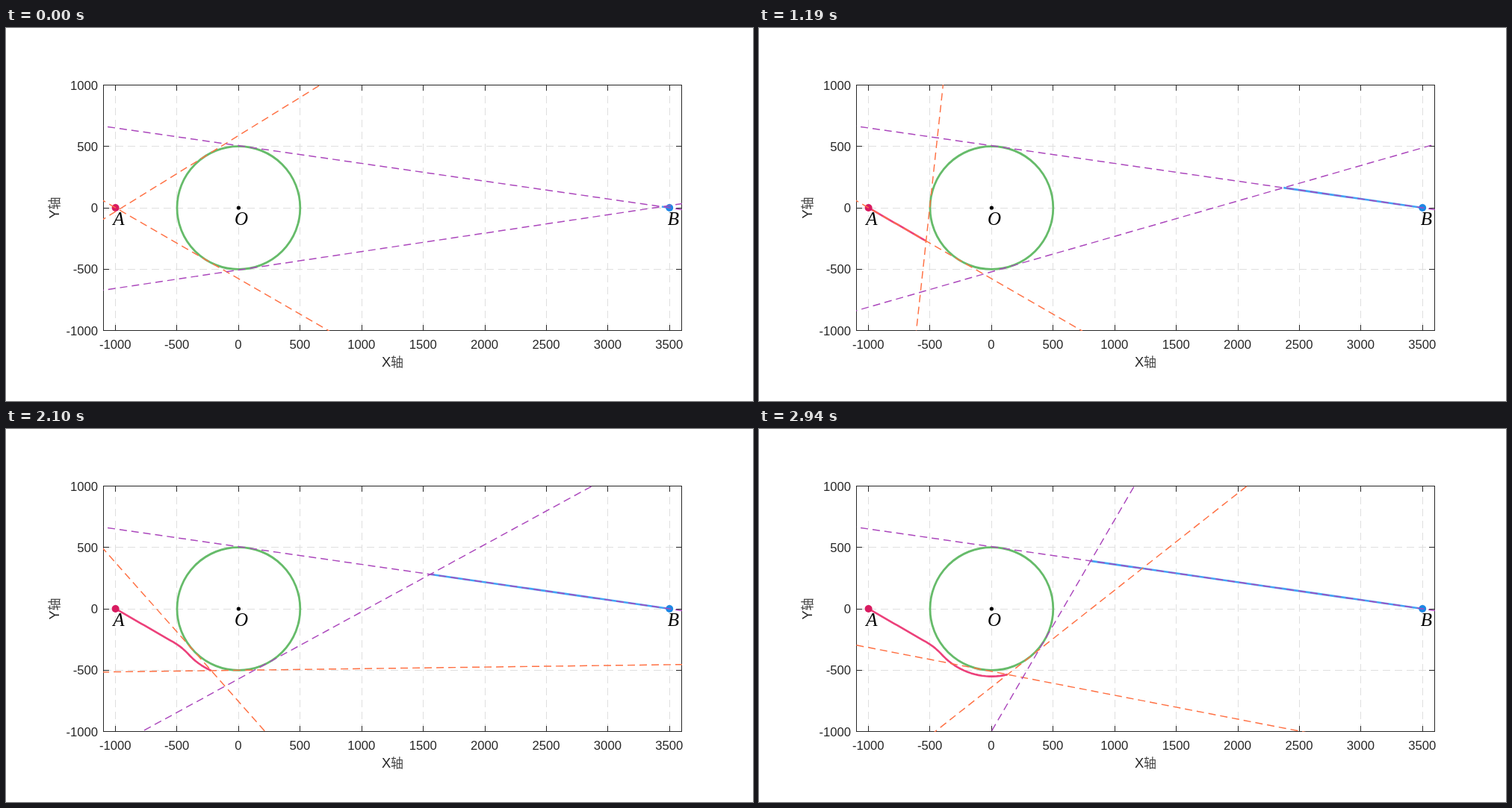
These frames come from a looping animation (1000 px wide and 500 px high, 3.01 s). An HTML page:

```html
<!DOCTYPE html>
<html lang="zh">
<head>
<meta charset="utf-8">
<title>Tangent paths</title>
<style>
  html, body { margin: 0; width: 100%; height: 100%; overflow: hidden; background: #fff; }
  svg { display: block; width: 1000px; height: 500px; }
  text { fill: #262626; font: 16.67px "Liberation Sans", Arial, sans-serif; }
  .title { font-size: 18.33px; text-anchor: middle; }
  .cjk { font: 300 17px "Noto Sans CJK SC", "Noto Sans CJK", sans-serif; fill: #444; }
  .name { font: italic 25px "Liberation Serif", "Times New Roman", serif; fill: #000; text-anchor: middle; }
  .grid { stroke: #dfdfdf; stroke-dasharray: 10 6; }
  .axis { stroke: #262626; fill: none; }
  .trail { fill: none; stroke-width: 2.6; stroke-linejoin: round; }
  .tangent { stroke-width: 1.45; stroke-dasharray: 10 6; }
</style>
</head>
<body>
<svg viewBox="0 0 1000 500">
  <defs><clipPath id="plot"><rect x="130" y="76" width="775" height="330"/></clipPath></defs>
  <g id="grid"></g>
  <g id="axes"><rect class="axis" x="130.5" y="76.5" width="774" height="329"/></g>
  <g clip-path="url(#plot)" id="scene"></g>
  <text class="name" x="151" y="264">A</text>
  <text class="name" x="315" y="264">O</text>
  <text class="name" x="893.5" y="264">B</text>
  <text class="title" x="517.5" y="454">X<tspan class="cjk">轴</tspan></text>
  <text class="title" transform="translate(70.5 241) rotate(-90)">Y<tspan class="cjk">轴</tspan></text>
</svg>
<script>
const STEP_MS = 70, STEPS = 43;
const RADIUS = 500, ORBIT = 550, TURN = 500;
const SCALE = 0.1648;
const { PI, sin, cos, acos, sqrt, floor } = Math;
const px = x => 311.4 + x * SCALE;
const py = y => 241 - y * SCALE;

function add(parent, tag, attrs, text = '') {
  const node = document.createElementNS('http://www.w3.org/2000/svg', tag);
  set(node, attrs);
  node.textContent = text;
  return parent.appendChild(node);
}
function set(node, attrs) {
  for (const key in attrs) node.setAttribute(key, attrs[key]);
}
const byId = id => document.getElementById(id);
const grid = byId('grid'), axes = byId('axes'), scene = byId('scene');

for (let v = -1000; v <= 3500; v += 500) {
  const x = floor(px(v)) + 0.5;
  add(grid, 'path', { class: 'grid', d: `M${x} 405V77` });
  add(axes, 'path', { class: 'axis', d: `M${x} 405v-7M${x} 77v7` });
  add(axes, 'text', { x: px(v) - 0.4, y: 430, 'text-anchor': 'middle' }, v);
}
for (let v = -1000; v <= 1000; v += 500) {
  const y = 241 - v * 0.1645;
  const line = floor(y) + 0.5;
  add(grid, 'path', { class: 'grid', d: `M131 ${line}H904` });
  add(axes, 'path', { class: 'axis', d: `M131 ${line}h7M904 ${line}h-7` });
  add(axes, 'text', { x: 123, y: y + 6.2, 'text-anchor': 'end' }, v);
}

const polar = (r, a, [x, y] = [0, 0]) => [x + r * cos(a), y + r * sin(a)];

// A: straight along its tangent, a right-hand arc, then the outer orbit.
const footA = PI * 4 / 3;
const bend = acos((RADIUS + TURN) / (ORBIT + TURN));
const leadIn = sqrt(1000 ** 2 - RADIUS ** 2) - (TURN + ORBIT) * sin(bend);
const turnCentre = polar(ORBIT + TURN, footA - bend);
function pathA(s) {
  if (s < leadIn) return polar(s, -PI / 6, [-1000, 0]);
  s -= leadIn;
  if (s < TURN * bend) return polar(TURN, footA - PI - s / TURN, turnCentre);
  return polar(ORBIT, footA - bend + (s - TURN * bend) / ORBIT);
}

// B: straight along its upper tangent.
const headingB = PI - Math.asin(RADIUS / 3500);
const pathB = s => polar(s, headingB, [3500, 0]);

function makeMover({ path, stride, trail, dot, tangent, reach, start }) {
  const trailNode = add(scene, 'polyline', { class: 'trail', stroke: trail });
  add(scene, 'circle', { cx: px(start), cy: 241, r: 5, fill: dot });
  return { path, stride, reach, trailNode, tangent };
}

add(scene, 'circle', { cx: px(0), cy: 241, r: RADIUS * SCALE, fill: 'none', stroke: '#66bb6a', 'stroke-width': 2.8 });
add(scene, 'circle', { cx: px(0), cy: 241, r: 2.6, fill: '#000' });

const movers = [
  { path: pathA, stride: 30, start: -1000, trail: '#ec407a', dot: '#d81b60', tangent: '#ff7043', reach: 968.4 },
  { path: pathB, stride: 380 / 6, start: 3500, trail: '#42a5f5', dot: '#1e88e5', tangent: '#ab47bc', reach: 973 }
].map(makeMover);
for (const mover of movers) {
  mover.lines = [-1, 1].map(() => add(scene, 'line', { class: 'tangent', stroke: mover.tangent }));
}

function placeTangent(line, normal, reach) {
  const [tx, ty] = polar(RADIUS, normal);
  const side = sin(normal) > 0 ? 1 : -1;
  const dx = side * sin(normal) * reach, dy = side * cos(normal) * reach;
  set(line, { x1: px(tx) - dx, y1: py(ty) - dy, x2: px(tx) + dx, y2: py(ty) + dy });
}

function draw(step) {
  for (const { path, stride, reach, trailNode, lines } of movers) {
    const points = Array.from({ length: step + 1 }, (_, i) => path(i * stride));
    set(trailNode, { points: points.map(([x, y]) => `${px(x)},${py(y)}`).join(' ') });
    const [x, y] = points[step];
    const angle = Math.atan2(y, x), spread = acos(RADIUS / Math.hypot(x, y));
    placeTangent(lines[0], angle - spread, reach);
    placeTangent(lines[1], angle + spread, reach);
  }
}

const begin = performance.now();
function tick(now) {
  draw(floor(Math.max(0, now - begin) / STEP_MS) % STEPS + 1);
  requestAnimationFrame(tick);
}
draw(1);
requestAnimationFrame(tick);
</script>
</body>
</html>
```
